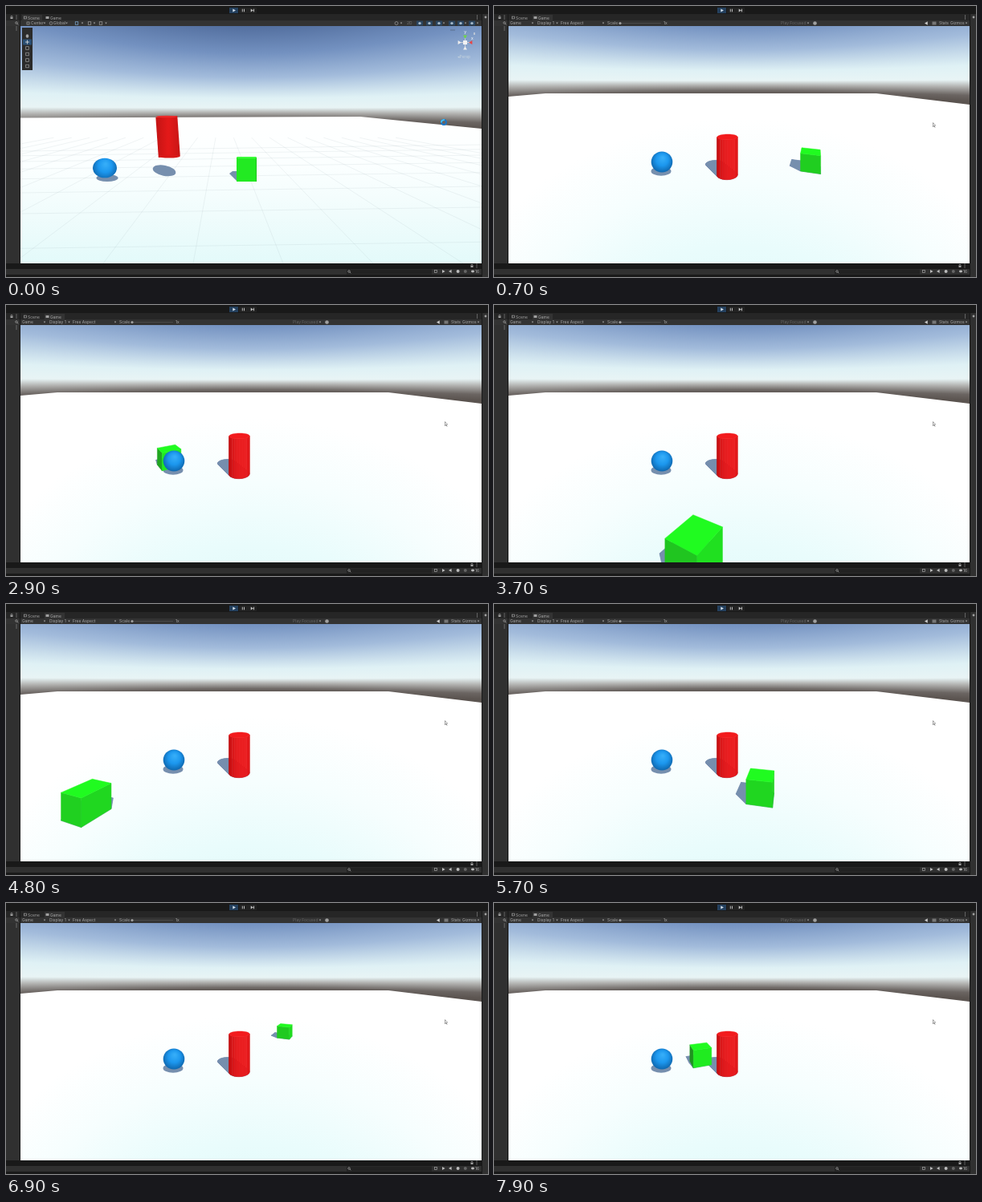
Recreate the animation shown at these times as an HTML page with a canvas. Size 600x338 px, loop 8000 ms.

```html
<!DOCTYPE html>
<html>
<head>
<meta charset="utf-8">
<style>
html, body { margin: 0; width: 100%; height: 100%; overflow: hidden; background: #191919; }
canvas { display: block; width: 600px; height: 338px; }
</style>
</head>
<body>
<canvas id="stage" width="600" height="338"></canvas>
<script>
const c = document.getElementById('stage').getContext('2d');
const LOOP = 8000, SWITCH = 600;
const VIEW = { x: 18, y: 25, w: 574, h: 296 };
const CX = 305, HORIZON = 95, FOCAL = 255, EYE = 4.76, CUBE = .95;
const SHADOW = '#768fae', ICON = '#a0a0a0', GRID = 'rgba(110,130,140,.17)';

// Waypoints of the cube: time, screen position of its centre, yaw in degrees
const waypoints = [
  { t: 600, x: 405, y: 200, yaw: 72 },
  { t: 1500, x: 343, y: 155.5, yaw: 50 },
  { t: 2300, x: 262, y: 159, yaw: 41 },
  { t: 2900, x: 203, y: 189, yaw: 38 },
  { t: 3700, x: 250, y: 306, yaw: 61 },
  { t: 4100, x: -40, y: 420, yaw: 65 },
  { t: 4400, x: -5, y: 264, yaw: 68 },
  { t: 5700, x: 332, y: 227, yaw: 77 },
  { t: 6300, x: 434, y: 200, yaw: 73 },
  { t: 6900, x: 347, y: 159.5, yaw: 66 },
  { t: 7900, x: 257, y: 188.5, yaw: 24 }
].map(p => {
  const z = (EYE - .5) * FOCAL / (p.y - HORIZON);
  return { t: p.t, yaw: p.yaw, x: (p.x - CX) * z / FOCAL, z };
});

// Smooth curve through the waypoints
function cubeAt(t) {
  const i = Math.max(0, waypoints.findIndex(p => p.t >= t) - 1);
  const a = waypoints[i], b = waypoints[i + 1];
  const before = waypoints[i - 1] || a, after = waypoints[i + 2] || b;
  const span = b.t - a.t, u = (t - a.t) / span;
  const blend = k => {
    const va = (b[k] - before[k]) / (b.t - before.t) * span;
    const vb = (after[k] - a[k]) / (after.t - a.t) * span;
    const d = b[k] - a[k];
    return a[k] + u * (va + u * (3 * d - 2 * va - vb + u * (va + vb - 2 * d)));
  };
  return prism(blend('x'), blend('z'), 4, Math.SQRT1_2, CUBE, blend('yaw'), green);
}

function rect(x, y, w, h, color) { c.fillStyle = color; c.fillRect(x, y, w, h); }

function poly(points, color, seam) {
  c.beginPath();
  points.forEach(p => c.lineTo(...p));
  c.closePath();
  c.fillStyle = color;
  c.fill();
  if (seam) { c.strokeStyle = color; c.lineWidth = .5; c.stroke(); }
}

function ellipse(x, y, rx, ry, color, tilt = 0) {
  c.beginPath();
  c.ellipse(x, y, rx, ry, tilt, 0, 7);
  c.fillStyle = color;
  c.fill();
}

function arc(x, y, r, color, width = .7, from = 0, to = 7) {
  c.beginPath();
  c.arc(x, y, r, from, to);
  c.strokeStyle = color;
  c.lineWidth = width;
  c.stroke();
}

function line(x1, y1, x2, y2, color, width = .8) {
  c.beginPath();
  c.moveTo(x1, y1);
  c.lineTo(x2, y2);
  c.strokeStyle = color;
  c.lineWidth = width;
  c.stroke();
}

function box(x, y, size, color) {
  c.strokeStyle = color;
  c.lineWidth = .7;
  c.strokeRect(x - size / 2, y - size / 2, size, size);
}

// Triangle around a point, pointing along an angle
function arrow(x, y, r, angle, color) {
  poly([0, 1, 2].map(i => {
    const a = angle + i * 2 * Math.PI / 3;
    return [x + r * Math.cos(a), y + r * Math.sin(a)];
  }), color);
}

function label(s, x, y = 23.3, color = '#a8a8a8') {
  c.font = '5px Inter, sans-serif';
  c.fillStyle = color;
  c.fillText(s, x, y);
}

function fade(gradient, ...colors) {
  colors.forEach((color, i) => gradient.addColorStop(i / (colors.length - 1), color));
  return gradient;
}

const project = (x, h, z) => [CX + FOCAL * x / z, HORIZON + FOCAL * (EYE - h) / z];
const green = d => `rgb(32,${Math.min(255, 155 + 125 * d)},32)`;
const red = d => `rgb(${200 + 55 * d},${16 + 14 * d},${18 + 14 * d})`;

// Upright prism on the floor: a cube with 4 sides, a cylinder with many
function prism(x, z, sides, radius, height, yaw, paint) {
  const base = Array.from({ length: sides }, (_, i) => {
    const a = yaw * Math.PI / 180 + (i + .5) * 2 * Math.PI / sides;
    return [x + radius * Math.cos(a), z + radius * Math.sin(a)];
  });
  const ring = h => base.map(p => project(p[0], h, p[1]));
  const shade = h => base.map(p => project(p[0] - .42 * h, 0, p[1] + .73 * h));
  return {
    z,
    shadow() {
      const foot = shade(0), tip = shade(height);
      poly(tip, SHADOW, true);
      foot.forEach((p, i) => {
        const j = (i + 1) % sides;
        poly([p, foot[j], tip[j], tip[i]], SHADOW, true);
      });
    },
    draw() {
      const low = ring(0), high = ring(height);
      base.forEach((p, i) => {
        const j = (i + 1) % sides, q = base[j];
        const mx = (p[0] + q[0]) / 2, mz = (p[1] + q[1]) / 2;
        const len = Math.hypot(mx - x, mz - z), nx = (mx - x) / len, nz = (mz - z) / len;
        if (nx * mx + nz * mz < 0)
          poly([low[i], low[j], high[j], high[i]], paint(nx * .32 - nz * .557), true);
      });
      poly(high, paint(.77), true);
    }
  };
}

function ball(x, y, rx, ry) {
  ellipse(x, y, rx, ry, fade(c.createRadialGradient(x + 1, y - ry * .4, 1, x, y - 1, rx + 1),
    '#35adf8', '#1c97ee', '#0e66ad'));
}

const cylinder = prism(-.6, 10.5, 40, .52, 1.95, 0, red);
const sphere = {
  z: 10.97,
  shadow: () => ellipse(208, 206, 12.5, 5.8, SHADOW),
  draw: () => ball(209, 194.5, 13.3, 13)
};

// Bands of equal elevation bend away from the horizon towards the sides
function sky(horizon) {
  const g = c.createLinearGradient(0, -104, 0, 16);
  [[-104, '#536f9f'], [-70, '#7391c0'], [-40, '#a2bbdb'], [-23, '#cbdfec'], [-14, '#dff1f5'],
    [-2, '#e8f4f5'], [4, '#b0b0ae'], [11, '#6b6562'], [16, '#5b5450']]
    .forEach(([y, color]) => g.addColorStop((y + 104) / 120, color));
  for (let x = VIEW.x; x < VIEW.x + VIEW.w; x += 2) {
    c.save();
    c.translate(0, horizon);
    c.scale(1, Math.hypot(1, (x - CX) / FOCAL));
    rect(x, -150, 2, 250, g);
    c.restore();
  }
}

function gameView(t) {
  sky(HORIZON);
  poly([[18, 113], [64, 109], [476, 109], [592, 123], [592, 321], [18, 321]],
    fade(c.createRadialGradient(CX, 560, 180, CX, 560, 420), '#e0fafa', '#e9fcfc', '#f6fefe', '#fff'));

  const items = [cubeAt(t), cylinder, sphere];
  items.forEach(o => o.shadow());
  items.sort((a, b) => b.z - a.z).forEach(o => o.draw());

  line(547, 148, 549, 151.5, '#777', 1);
  poly([[546, 145], [546, 151], [550, 149]], '#777');
  poly([[546.6, 146.3], [546.6, 149.8], [549, 148.8]], '#fff');
}

function sceneView(t) {
  sky(129);
  poly([[18, 139.5], [441, 138], [592, 153], [592, 321], [18, 321]],
    fade(c.createLinearGradient(0, 139, 0, 321), '#fff', '#fbffff', '#f0fcfc', '#e3fafa'));
  for (let i = -9; i <= 10; i++) {
    const x = 268 + i * 112 - 35, top = .2;
    line(268 + (x - 268) * top, 125 + 196 * top, x, 321, GRID, .6);
  }
  for (let i = 2; i < 11; i++) line(18, 129 + 520 / i, 592, 121 + 520 / i, GRID, .6);

  ellipse(126, 214.5, 13.5, 4.5, SHADOW);
  ball(123, 202, 15, 12.3);
  ellipse(197, 205.3, 14.5, 6.5, SHADOW, .2);
  poly([[278, 209], [282, 206], [288, 206], [288, 219]], SHADOW);
  line(199.8, 138, 203.3, 188, fade(c.createLinearGradient(187, 0, 217, 0), '#c41414', '#e41919', '#c81515'), 27);
  ellipse(203.2, 187.5, 13.4, 2, '#d81818');
  ellipse(199.8, 138, 13.3, 1.3, '#ec2a2a');
  rect(287, 188.5, 25, 30.5, '#22ea22');
  rect(288, 188, 23, 2, '#3cff3c');
  line(311.5, 190, 311.5, 219, '#1cbc1c');

  rect(20, 27, 13, 53, '#2b2b2b');
  rect(21, 41.5, 11, 7, '#2a4f74');
  for (let i = 0; i < 6; i++) {
    const y = 37.5 + 7.5 * i;
    if (i === 0) ellipse(26.5, y, 1.8, 2.2, ICON);
    else if (i === 1) { line(24, y, 29, y, '#ddd'); line(26.5, y - 2.5, 26.5, y + 2.5, '#ddd'); }
    else box(26.5, y, 3.6, ICON);
  }

  ['#e84545', '#eee', '#eee', '#6fd648'].forEach((color, i) => {
    const a = i * Math.PI / 2, dx = Math.cos(a), dy = Math.sin(a);
    line(571.5, 45.5, 571.5 + 8 * dx, 45.5 + 8 * dy, '#ddd');
    arrow(571.5 + 7.5 * dx, 45.5 + 7.5 * dy, 2.8, a + Math.PI, color);
  });
  rect(569, 43, 5, 5, '#f2f2f2');
  label('y', 570.3, 34, '#fff');
  label('x', 579, 42, '#fff');
  rect(582, 33, 2, 3, '#b8c4d4');
  line(553, 30, 559, 30, '#54657f');
  label('◂Persp', 562, 65, '#c4d2de');

  const turn = t < 300 ? 3 : 5;
  arc(545, 145, 3, '#1976c9', 1.8);
  arc(545, 145, 3, '#43c0f5', 1.8, turn, turn + 2);
}

const caret = x => arrow(x, 21.2, 1.4, Math.PI / 2, ICON);

function dots(x, y) { [-2, 0, 2].forEach(d => rect(x - .5, y + d - .5, 1, 1, ICON)); }

function lock(x, y) {
  rect(x - 1.5, y - .3, 3, 2.3, ICON);
  arc(x, y - .5, 1.2, ICON, .7, Math.PI, 0);
  dots(x + 6, y);
}

function magnifier(x, y) {
  arc(x, y, 1.3, ICON);
  line(x + 1, y + 1, x + 2.3, y + 2.3, ICON);
}

function gameToolbar() {
  label('Game', 20);
  label('Display 1', 54);
  label('Free Aspect', 83);
  [48, 78.5, 136, 391, 588].forEach(caret);
  label('Scale', 141);
  line(155, 21.5, 208, 21.5, '#505050');
  ellipse(157, 21.5, 1.6, 1.6, ICON);
  label('1x', 211);
  label('Play Focused', 357, 23.3, '#666');
  ellipse(399.5, 21.5, 2.3, 2.3, ICON);
  arrow(538.5, 21.5, 2.5, Math.PI, '#ccc');
  rect(545.5, 19.5, 5, 4, '#777');
  label('Stats', 554);
  label('Gizmos', 568);
}

function sceneToolbar() {
  box(27.5, 21.5, 3, ICON);
  label('Center', 31);
  arc(56, 21.5, 1.8, ICON);
  label('Global', 59);
  [48, 75.5, 95, 110, 124.5, 492, 545, 572, 587].forEach(caret);
  [88, 104, 118].forEach(x => box(x, 21.5, 3.5, x < 90 ? '#7fb0dd' : ICON));
  arc(486, 21.5, 2, ICON);
  label('2D', 499, 23.3, '#777');
  [515, 527, 539, 555, 566, 580].forEach(x => {
    rect(x - 4, 18.5, 8, 6, '#2b4560');
    ellipse(x, 21.5, 1.7, 1.5, '#a9bccb');
  });
}

function chrome(inGame) {
  rect(0, 0, 600, 10, '#191919');
  rect(0, 10, 600, 8, '#262626');
  rect(0, 18, 592, 7, '#333');
  rect(0, 25, 17, 296, '#303030');
  rect(17, 10, 1, 311, '#191919');
  rect(592, 10, 1, 311, '#191919');
  rect(593, 10, 7, 328, '#303030');
  rect(0, 321, 592, 17, '#191919');
  rect(0, 328, 592, 7, '#303030');

  rect(278, 2, 11, 7, '#24405e');
  rect(290, 2, 22, 7, '#222');
  arrow(283.5, 5.5, 2.4, 0, '#d5e2ee');
  [293.8, 296, 308].forEach(x => rect(x, 3.7, 1, 3.6, '#bbb'));
  arrow(305.8, 5.5, 2.2, 0, '#bbb');

  rect(inGame ? 48 : 20, 11, 25, 7, '#333');
  box(24, 14.5, 2.8, ICON);
  label('Scene', 27, 16.5);
  rect(49.5, 13, 4, 3, ICON);
  label('Game', 55, 16.5);
  lock(7, 14);
  lock(580, 324);
  magnifier(13, 21);
  dots(586.5, 14);
  dots(13, 28);
  ellipse(597, 14, 1.4, 1.4, ICON);

  rect(424, 328.5, 106, 6, '#222');
  magnifier(427, 331);
  for (let i = 0; i < 6; i++) {
    const x = 535 + 9.2 * i;
    if (i === 0) box(x, 331, 3, ICON);
    else if (i < 3) arrow(x, 331, 2.4, i - 1, '#bbb');
    else ellipse(x, 331, 2, i < 5 ? 2 : 1.4, i === 4 ? '#666' : '#bbb');
  }
  label('16', 584, 333);
  if (inGame) gameToolbar(); else sceneToolbar();
}

function frame() {
  const t = Math.floor(performance.now() % LOOP / 100) * 100;
  const inGame = t >= SWITCH;
  c.save();
  c.beginPath();
  c.rect(VIEW.x, VIEW.y, VIEW.w, VIEW.h);
  c.clip();
  if (inGame) gameView(t); else sceneView(t);
  c.restore();
  chrome(inGame);
  requestAnimationFrame(frame);
}
frame();
</script>
</body>
</html>
```
